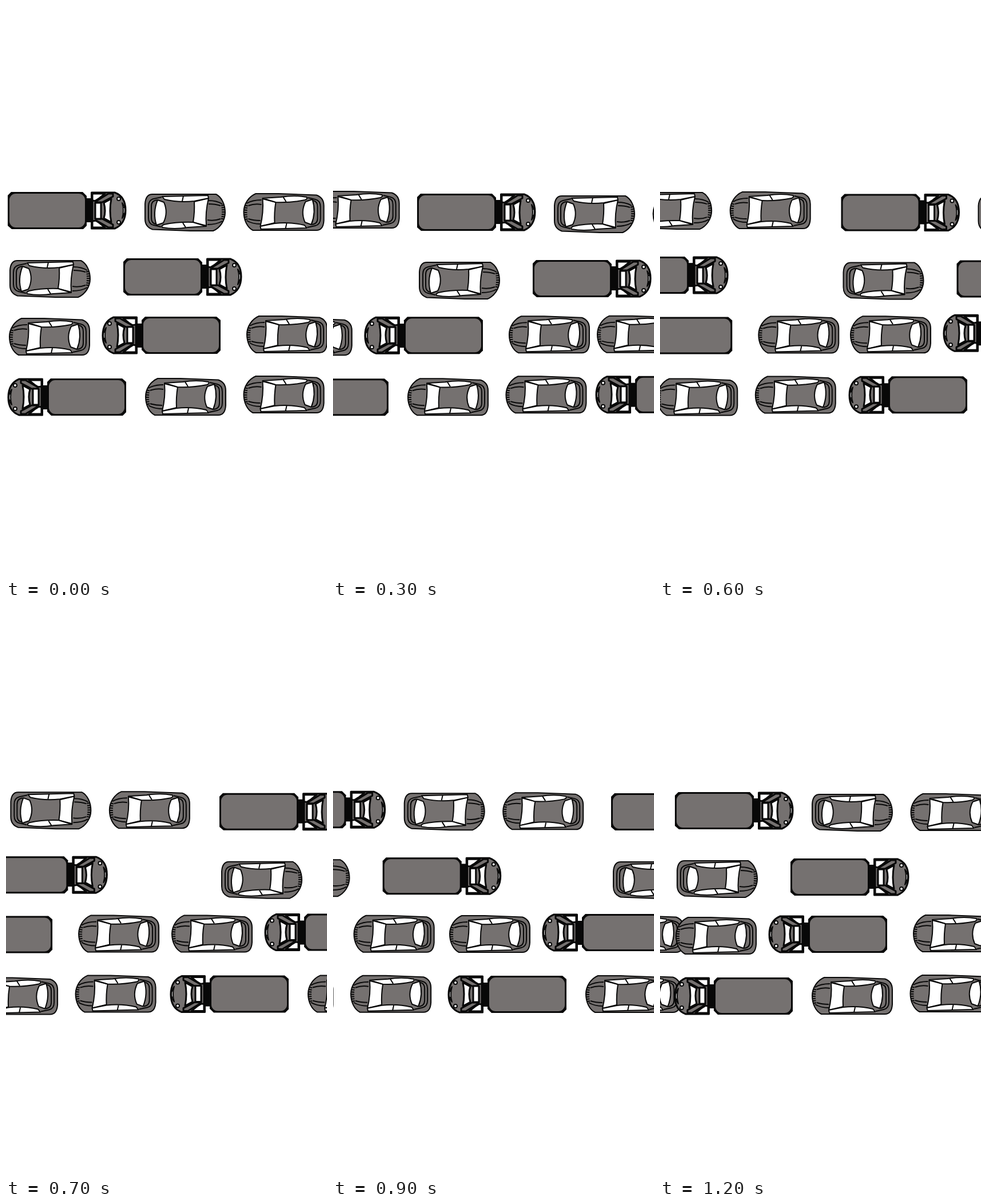
Write an HTML page that moves like this. It is 561x998 px and loops after 1.25 s.

```html
<!DOCTYPE html>
<html lang="en">
<head>
<meta charset="utf-8">
<title>Traffic</title>
<style>
  html, body { margin: 0; width: 100%; height: 100%; overflow: hidden; background: #fff; }
  svg { display: block; width: 100%; height: 100%; }
  .body { fill: #757170; }
  .glass { fill: #fff; }
  .line { fill: none; }
  .solid { fill: #080808; stroke: none; }
</style>
</head>
<body>
<svg viewBox="0 0 561 998">
  <defs>
    <!-- car, nose to the left, 142 x 66 -->
    <g id="car" stroke="#080808" stroke-width="2" stroke-linejoin="round">
      <path class="body" d="M22 1H62L128 3.500Q141 8 141 22V48Q140 65 128 65H17C7 60 1 47 1 33S10 6 22 1Z"/>
      <path class="line" d="M6 18Q16 12 32 12M6 48Q16 54 30 54M9 22Q20 18 32 20M9 45Q18 48 30 48"/>
      <path class="line" stroke-dasharray="2 2" stroke-width="5" d="M6 21Q3 33 6 48"/>
      <path class="line" d="M113 8L126 11Q135 13 135 24V44Q135 55 126 57L112 60M122 13Q130 14 130 24V44Q130 54 120 55"/>
      <path class="glass" d="M34 10L57 16Q54 34 55 52L30 58Q36 33 34 10Z"/>
      <path class="glass" d="M109 15L121 11Q128 33 119 55L108 51Q100 33 109 15Z"/>
      <path class="glass" d="M34 9L66 7Q90 3 111 7Q113 10 108 12Q84 17 57 16Z"/>
      <path class="glass" d="M30 58L55 53Q82 50 107 56L111 61L31 63Z"/>
      <path class="line" d="M70 7L75 15M76 53L74 62"/>
    </g>
    <!-- truck, nose to the right, 207 x 67 -->
    <g id="truck" stroke="#080808" stroke-width="3" stroke-linejoin="round">
      <path class="solid" d="M6 1H131L138 8V60L132 66H7L0 60V7Z"/>
      <rect class="body" x="3" y="4" width="132" height="59" rx="11" stroke="none"/>
      <path class="solid" d="M136 12H146V54H136Z"/>
      <path class="body" d="M146.500 2H187Q206 9 206 33T187 65H146.500Z"/>
      <path class="glass" d="M148 4H170L160 12L152 17H148ZM148 63H170L160 55L152 50H148Z"/>
      <path class="body" d="M148 16L155 17L176 4H184V9L165 19H153V48H165L184 58V63H176L155 51L148 52Z"/>
      <path class="glass" d="M153 20H163V48H153Z"/>
      <path class="glass" d="M168 20L181 13Q177 34 181 54L168 47Q172 34 168 20Z"/>
      <path class="glass" stroke-width="2" d="M200 20Q210 33 200 47Q204 33 200 20Z"/>
      <path class="line" stroke-width="2" d="M202 28H206M202 39H206"/>
      <g class="glass" stroke-width="2">
        <circle cx="194" cy="13" r="3"/>
        <circle cx="194" cy="54" r="3"/>
      </g>
    </g>
  </defs>
</svg>
<script>
const svg = document.querySelector('svg');
const LOOP = 1250, STEP = 50;
const size = { car: [142, 66], truck: [207, 67] };

// kind, x, y, turned by half a circle
const eastbound = [
  ['truck', 3, 324], ['car', 242, 328, true], ['car', 414.5, 327],
  ['car', 6, 444, true], ['truck', 205, 440]
];
const westbound = [
  ['car', 5, 545], ['truck', 168, 542, true], ['car', 420, 541],
  ['truck', 3, 650, true], ['car', 243, 650], ['car', 414.5, 646]
];

// Each convoy drives along key points of time, x, y
const convoys = [
  { cars: eastbound, path: [[50, 0, 0], [300, 144, 3], [900, 483, 4], [1050, 542, 4]] },
  { cars: eastbound, path: [[0, -573, -4], [500, -351, -4], [1050, -31, 2], [1200, 23, 2]] },
  { cars: westbound, path: [[50, 0, 0], [1200, -520, 1]] },
  { cars: westbound, path: [[0, 585, -5], [900, 198, -3], [1200, 22, 0]] }
];

function add(parent, tag, attrs = {}) {
  const el = document.createElementNS('http://www.w3.org/2000/svg', tag);
  for (const name in attrs) el.setAttribute(name, attrs[name]);
  return parent.appendChild(el);
}

for (const convoy of convoys) {
  convoy.group = add(svg, 'g');
  for (const [kind, x, y, turned] of convoy.cars) {
    const [w, h] = size[kind];
    const transform = turned ? `translate(${x + w} ${y + h}) rotate(180)` : `translate(${x} ${y})`;
    add(convoy.group, 'use', { href: '#' + kind, transform });
  }
}

// Constant speed between key points; waits at the first, drives on past the last
function position(path, t) {
  let i = 0;
  while (i < path.length - 2 && t > path[i + 1][0]) i++;
  const [t0, x0, y0] = path[i], [t1, x1, y1] = path[i + 1];
  const k = Math.max(0, (t - t0) / (t1 - t0));
  return [x0 + (x1 - x0) * k, y0 + (y1 - y0) * k];
}

function draw(now) {
  const t = Math.floor(now % LOOP / STEP) * STEP;
  for (const { group, path } of convoys) {
    group.setAttribute('transform', `translate(${position(path, t)})`);
  }
  requestAnimationFrame(draw);
}
draw(performance.now());
</script>
</body>
</html>
```
